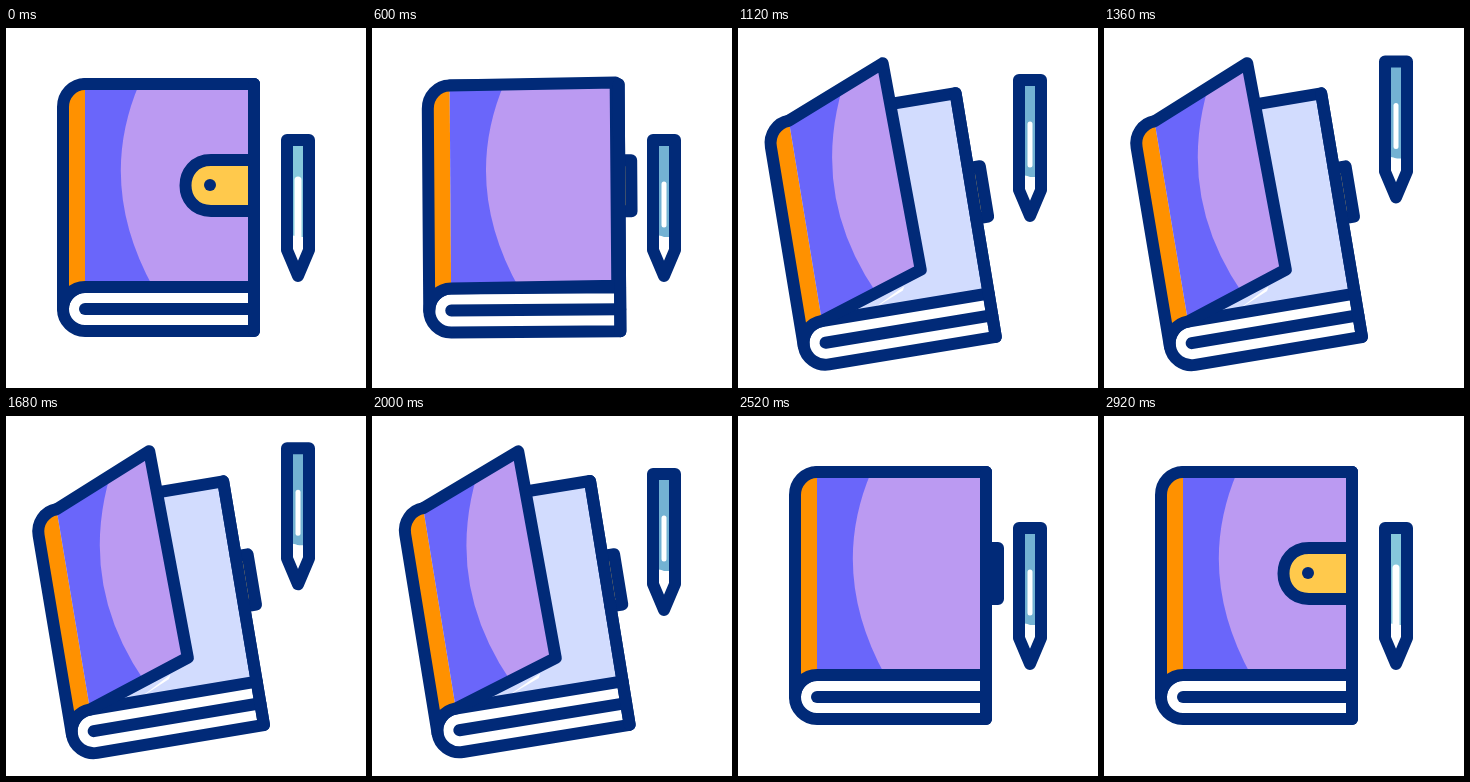
Animation, 360 px wide and 360 px high, one loop 3000 ms. Source, as an HTML page:

```html
<!DOCTYPE html>
<html lang="en">
<head>
<meta charset="utf-8">
<title>Notebook and pencil</title>
<style>
  html, body { margin: 0; width: 100%; height: 100%; overflow: hidden; background: #fff; }
  svg { display: block; width: 100%; height: 100%; }
  .line { fill: none; stroke: #012a78; stroke-width: 12; stroke-linecap: round; stroke-linejoin: round; }
</style>
</head>
<body>
<svg viewBox="0 0 360 360">
  <defs><clipPath id="coverClip"><path class="cover"/></clipPath></defs>
  <g id="book">
    <!-- pages and back cover -->
    <path d="M79 56H248V259H79Z" fill="#d2dcfe"/>
    <path id="gleam" fill="#fff"/>
    <path class="line" d="M79 56H248V259"/>
    <path class="line" style="fill:#fff" d="M248 259H79A22 22 0 0 0 79 303H248Z"/>
    <path class="line" d="M79 281H248"/>
    <!-- front cover -->
    <g clip-path="url(#coverClip)">
      <path d="M40 0H79V300H40Z" fill="#ff9100"/>
      <path d="M79 0H260V300H79Z" fill="#6a66fa"/>
      <path id="sheen" fill="#bb9af2"/>
    </g>
    <path class="cover line"/>
    <path id="strap" class="line" style="fill:#ffc94c"/>
    <ellipse id="stud" cy="157" ry="6" fill="#012a78"/>
    <path class="line" d="M248 56V303"/>
  </g>
  <g id="pencil">
    <path id="barrel" d="M281 112H303V209H281Z"/>
    <path d="M281 209Q287 206 292 209T303 209V222L292 248L281 222Z" fill="#fff"/>
    <path id="shine" fill="none" stroke="#fff" stroke-linecap="round"/>
    <path class="line" d="M281 112H303V222L292 248L281 222Z"/>
  </g>
</svg>
<script>
  const LOOP = 3000, STEP = 40, TURN = 1540;
  const $ = id => document.getElementById(id);
  const set = (el, attrs) => { for (const k in attrs) el.setAttribute(k, attrs[k]); };
  const mix = (a, b, p) => a + (b - a) * p;
  const bezier = (a, b, u) => 3 * (1 - u) ** 2 * u * a + 3 * (1 - u) * u * u * b + u ** 3;
  const covers = document.querySelectorAll('.cover');

  // cubic-bezier(.25, .1, .25, 1) between two times
  function ease(t, from, to) {
    const x = Math.min(1, Math.max(0, (t - from) / (to - from)));
    let lo = 0, hi = 1;
    for (let i = 0; i < 24; i++) {
      const mid = (lo + hi) / 2;
      if (bezier(.25, .25, mid) < x) lo = mid; else hi = mid;
    }
    return x === 0 || x === 1 ? x : bezier(.1, 1, lo);
  }

  function draw(time) {
    // the second half plays the first half backwards
    const t = time > TURN ? 2 * TURN - time : time;
    const unstrap = ease(t, 220, 560);
    const open = ease(t, 560, 1220);
    const lift = ease(t, 800, 1520);
    const resting = t < 240;

    set($('book'), { transform: `rotate(${-9.5 * open} 289 246)` });

    const topRight = `${mix(248, 180, open)} ${mix(56, 14, open)}`;
    const bottomRight = `${mix(248, 184, open)} ${mix(259, 224, open)}`;
    const d = `M57 281A22 22 0 0 1 79 259L${bottomRight}L${topRight}L79 56A22 23 0 0 0 57 79Z`;
    covers.forEach(el => set(el, { d }));
    set($('sheen'), { d: `M${165 - 10 * open} 0Q74 128 148 261L152 300H260V0Z` });

    const edge = Math.min(240, 303 - 139 * open);
    set($('gleam'), { d: open > .2 ? `M130 256L${edge} 238L${edge - 2} ${mix(252, 242, open)}Z` : '' });

    const bend = mix(205, 260, unstrap), tip = bend - mix(34, 0, unstrap);
    set($('strap'), { d: `M248 132H${bend}C${tip} 132 ${tip} 183 ${bend} 183H248` });
    set($('stud'), { cx: mix(204, 255, unstrap), rx: 6 * Math.max(0, 1 - unstrap / .85) });

    set($('pencil'), { transform: `translate(0 ${-81 * lift})` });
    set($('barrel'), { fill: resting ? '#86c8dc' : '#73b2d3' });
    set($('shine'), { d: resting ? 'M292 152V212' : 'M292 156V197', 'stroke-width': resting ? 7 : 5 });
  }

  const start = performance.now();
  function tick() {
    const time = (performance.now() - start) % LOOP;
    draw(Math.floor(time / STEP) * STEP);
    requestAnimationFrame(tick);
  }
  tick();
</script>
</body>
</html>
```
